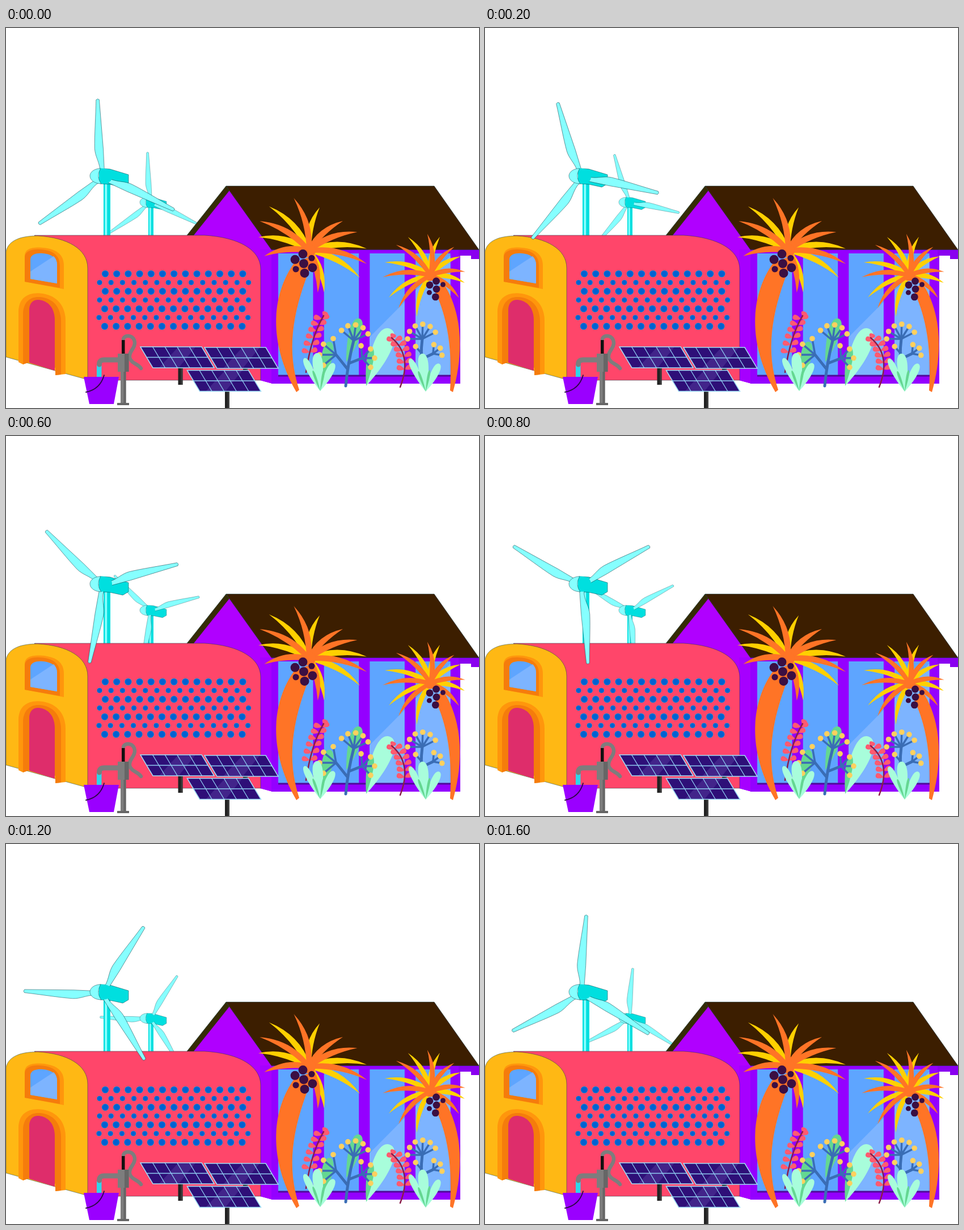
An HTML page for the animation above (1.7 s loop, 834x671 px).

```html
<!DOCTYPE html>
<html lang="en">
<head>
<meta charset="utf-8">
<title>Wind and sun village</title>
<style>
html, body { margin: 0; width: 100%; height: 100%; overflow: hidden; background: #fff; }
svg { display: block; width: 100%; height: 100%; }
.edge { stroke: #0a3a44; stroke-width: .5; }
</style>
</head>
<body>
<svg id="stage" viewBox="0 0 834 671"></svg>
<script>
const STEP = 100, LOOP = 1700, SWEEP = 120;
const LIGHT = '#86ffff', CYAN = '#00dfdf', ORANGE = '#ff7426', YELLOW = '#ffd000';
const STEM = '#3a6db5', PINK = '#ff5a70', MINT = '#a8fddb', GREEN = '#64d791';
const SKY = '#5ea5ff', GLARE = '#7db4ff', AMBER = '#ff960c', RUST = '#f57c0c';
const GRAY = '#7d7d7d', DIM = '#666';

const times = (n, f) => Array.from({ length: n }, (_, i) => f(i)).join('');
const polar = (x, y, r, deg) => {
  const a = deg * Math.PI / 180;
  return [x + r * Math.cos(a), y + r * Math.sin(a)];
};
const shape = (d, fill, extra = '') => `<path d="${d}" fill="${fill}" ${extra}/>`;
const line = (d, stroke, w) =>
  `<path d="${d}" fill="none" stroke="${stroke}" stroke-width="${w}" stroke-linecap="round"/>`;
const rect = (x, y, w, h, fill) =>
  `<rect x="${x}" y="${y}" width="${w}" height="${h}" fill="${fill}"/>`;
const disc = (x, y, r, fill) => `<circle cx="${x}" cy="${y}" r="${r}" fill="${fill}"/>`;

// Point at fraction k of the way from base to tip, s to the side
function axis(x, y, tx, ty) {
  const dx = tx - x, dy = ty - y, n = Math.hypot(dx, dy);
  return (k, s) => `${x + dx * k - dy / n * s},${y + dy * k + dx / n * s}`;
}

// Round-ended leaf
function leaf(x, y, tx, ty, w, fill) {
  const at = axis(x, y, tx, ty);
  return shape(`M${x},${y} C${at(.55, w)} ${at(1, w)} ${tx},${ty} C${at(1, -w)} ${at(.55, -w)} ${x},${y}Z`, fill);
}

// Pointed frond that arches upwards from the crown
function frond(x, y, len, deg, w, fill) {
  const [tx, ty] = polar(x, y, len, deg), at = axis(x, y, tx, ty);
  const bow = (tx < x ? 1 : -1) * len * .17;
  return shape(`M${at(0, -w * .5)} Q${at(.5, bow - w)} ${tx},${ty} Q${at(.5, bow + w)} ${at(0, w * .5)}Z`, fill);
}

/* ---------- turbines ---------- */
const BLADE = 'M-2.8,-137.5 Q0,-140.5 2.8,-137.5 L4.6,-50 L4,-4 H-4 L-3.5,-16 ' +
  'C-4.5,-30 -10.5,-38 -10.5,-52 C-9.5,-76 -5,-110 -2.8,-137.5Z';

const rotor = (id, x, y, s) =>
  `<g id="${id}" transform="translate(${x} ${y}) scale(${s})">${shape(BLADE, LIGHT, 'class="edge"').repeat(3)}</g>`;
const nacelle = shape('M166,248 L183,249 L216,259 V275 L206,281 L183,276 L166,275Z', CYAN, 'class="edge"');
const hub = shape('M164,248 C180,247 187,252 187,262 C187,272 180,275 164,275Z', CYAN) +
  shape('M167,248 C155,248 148,255 148,261 C148,269 157,275 168,275 C161,266 162,256 167,248Z', LIGHT, 'class="edge"');
const tower = (x, y, w) => rect(x, y, w, 370 - y, CYAN) + rect(x + w * .2, y, w * .32, 370 - y, LIGHT);
const shrink = g => `<g transform="translate(236 299) scale(.69 .66) translate(-148 -248)">${g}</g>`;

const smallTurbine = () => tower(251, 314, 9) + shrink(nacelle) + rotor('small', 255, 308.5, .644) + shrink(hub);
const bigRotor = () => nacelle + rotor('big', 170, 264, 1) + hub;

/* ---------- buildings ---------- */
function house() {
  return shape('M388,279 L319,366 L350,380 L394,287Z', '#352b05', 'class="edge"') +
    shape('M394,287 L331,366 L380,400 L448,420 V622 L470,628 V391Z', '#b000ff') +
    shape('M448,391 H470 V628 L448,622Z', '#a600ff') +
    rect(468, 391, 333, 237, '#9400ff') +
    shape('M798,391 H834 V408 H820 V402 H798Z', '#8a00f0') +
    times(4, i => rect(480 + i * 80.7, 398, 61.5, 216, SKY)) +
    shape('M702.5,484 V614 H641 V546Z', GLARE) +
    shape('M722,464 L783.5,402 V614 H722Z', GLARE) +
    rect(480, 612.5, 304, 3, '#4f0a9a') +
    shape('M388,279 H755 L834,391.5 H468Z', '#3c1e00', 'class="edge"');
}

// Rounded vents in alternating rows of large and small
function vents() {
  return times(7, row => {
    const small = row % 2, y = 434 + row * 15.45;
    const x0 = (small ? 165 : 175) - (row > 3 ? 1 : 0), r = small ? 4.1 : 5.6;
    return times(13 + small, i =>
      disc(x0 + i * 20.2, y, r + .7, '#3a8fc0') + disc(x0 + i * 20.2, y, r, '#0062d2'));
  });
}

function dome() {
  return shape('M50,366 H350 C412,370 449,392 449,426 V622 H144 L100,420Z', '#ff466a', 'class="edge"') +
    shape('M0,395 C4,374 28,367 56,367 C108,370 144,390 144,424 V621 L104,610 L0,581Z', '#ffb814', 'class="edge"') +
    // window
    shape('M33,448 V402 C33,391 44,387 60,387.5 C88,389 102,399 102,420 V461Z', AMBER) +
    shape('M33,448 V404 C34,394 46,390 60,391 C82,392 95,401 95,420 V459Z', RUST) +
    shape('M43,443 V408 C44,399 55,397 65,398 C80,399 90,406 90,418 V451Z', SKY) +
    shape('M43,443 V430 L84,403 C88,407 90,412 90,418 V451Z', GLARE) +
    // door
    shape('M22,590 V502 C22,478 37,467 60,468.5 C90,471 105,491 105,517 V611 L87,613 V600 L41,590 L30,594Z', AMBER) +
    shape('M30,594 V504 C31,484 42,474 60,475 C84,477 97,494 97,518 V612 L87,613 V600 L41,590Z', RUST) +
    shape('M41,591 V496 C42,484 49,479 58,480 C76,482 86,496 86,516 V605Z', '#de2d6b') +
    vents();
}

/* ---------- pump, bucket, solar panels ---------- */
function pump() {
  return rect(160, 594, 8.5, 24, '#2fd6ea') +
    shape('M137,616 H199 L190,664 H147Z', '#9a00ff') +
    line('M141,643 Q166,638 173,613', '#2c0845', 1.8) +
    line('M207,549 C209,541 226,541 227,556 C227,567 216,571 218,582 C221,593 232,592 238,601', GRAY, 6.5) +
    rect(204, 551, 5.5, 26, '#111') +
    line('M164.5,594 Q164.5,586 173,586 H199', GRAY, 9) +
    rect(202, 600, 9.5, 64, GRAY) + rect(207.5, 600, 4, 64, DIM) +
    rect(197, 575, 19.5, 32, GRAY) + rect(209, 575, 7.5, 32, DIM) +
    rect(196, 662, 21, 4, DIM);
}

function panel(x, y) {
  const p = (u, v) => `${x + u * 108 + v * 22},${y + v * 37}`;
  const box = `M${p(0, 0)} L${p(1, 0)} L${p(1, 1)} L${p(0, 1)}Z`;
  const grid = `M${p(0, .5)} L${p(1, .5)}` + times(4, i => `M${p((i + 1) / 5, 0)} L${p((i + 1) / 5, 1)}`);
  return shape(box, '#2e0f78') +
    shape(`M${p(.62, 0)} L${p(.9, 0)} L${p(.42, 1)} L${p(.1, 1)}Z`, '#42248a') +
    line(grid, '#8fcdf2', 1.3) + line(box, '#9fdcf5', 1.5);
}

function solar() {
  const leg = (x, y, h) => rect(x, y, 8, h, '#222') + rect(x + 5, y, 3, h, '#3c3c3c');
  return leg(303.5, 598, 32) + leg(418, 598, 10) + panel(237, 563) + panel(350, 564) +
    leg(386, 638, 33) + panel(319.5, 604.5);
}

/* ---------- palms ---------- */
function crown(x, y, w, reach, yellow, orange) {
  const fan = (angles, fill) => angles.map(a => frond(x, y, reach(a), a, w, fill)).join('');
  return fan(yellow, YELLOW) + fan(orange, ORANGE) + disc(x, y, w * 1.5, ORANGE);
}

// Cluster of nuts: one in the middle, the rest in a ring
const nuts = (x, y, ring, r, from, step, n) => disc(x, y, r, '#3b0f42') +
  times(n, i => disc(...polar(x, y, ring, from + i * step), i % 3 == 1 ? r * .7 : r, '#3b0f42'));

const palmLeft = () =>
  shape('M508,415 C468,472 462,555 512,643 L517,639 C494,568 503,500 546,400Z', ORANGE) +
  crown(534, 393, 8, a => 90 + 15 * Math.cos((a - 228) / 145 * 2 * Math.PI),
    [195, 228, 284, 358, 388, 430], [173, 211, 254, 319, 339, 373, 438]) +
  nuts(525, 416, 17, 8, -95, 60, 6);

// Evenly spread fronds, longer on the left
const spread = from => Array.from({ length: 7 }, (_, i) => from + i * 44);
const palmRight = () =>
  shape('M754,460 C784,520 786,585 783,640 L788,643 C806,580 807,506 772,452Z', ORANGE) +
  crown(748, 437, 6.5, a => 73 - 11 * Math.cos(a * Math.PI / 180), spread(108), spread(134)) +
  nuts(759, 461, 14, 6.4, 97, 57, 5);

/* ---------- flowers ---------- */
// Curved stem with paired leaflets
function sprig(x0, y0, cx, cy, x1, y1) {
  const q = (a, b, c, t) => (1 - t) ** 2 * a + 2 * t * (1 - t) * b + t * t * c;
  return times(6, i => {
    const t = .3 + i * .125, x = q(x0, cx, x1, t), y = q(y0, cy, y1, t);
    return leaf(x, y, x - 14, y - 4, 6, PINK) + leaf(x, y, x + 13, y - 6, 6, PINK);
  }) + leaf(x1, y1 + 2, x1 + 4, y1 - 7, 7, PINK) +
    line(`M${x0},${y0} Q${cx},${cy} ${x1},${y1}`, '#8a1c4a', 2.5);
}

// Fan of short twigs, each ending in a yellow berry
const umbel = (x, y, r, from, to, n) => times(n, i => {
  const [bx, by] = polar(x, y, r, from + (to - from) * i / Math.max(1, n - 1));
  return line(`M${x},${y} L${bx},${by}`, STEM, 3.5) + disc(bx, by, 4.8, '#ffd05e');
});

const tuft = (x, y) =>
  leaf(x, y, x - 28, y - 58, 8, MINT) + leaf(x, y, x + 24, y - 49, 9, MINT) +
  leaf(x, y, x - 6, y - 67, 12, MINT) +
  leaf(x, y, x + 7, y - 38, 3, GREEN) + leaf(x, y, x - 13, y - 36, 3, GREEN);

const plants = () =>
  leaf(600, 590, 623, 513, 14, GREEN) + leaf(635, 632, 677, 531, 22, MINT) +
  leaf(635, 632, 645, 565, 8, GREEN) + leaf(556, 632, 571, 554, 13, GREEN) +
  sprig(529, 608, 538, 545, 560, 508) + sprig(695, 634, 717, 578, 680, 547) +
  line('M599,632 Q603,590 613,552 M602,602 L582,577 M605,592 L628,583', STEM, 5) +
  umbel(613, 552, 28, -140, -25, 5) + umbel(582, 577, 29, 140, 260, 4) + umbel(628, 583, 22, -95, 47, 4) +
  line('M735,612 Q730,580 734,549 M734,584 L753,575', STEM, 5) +
  umbel(734, 549, 26, 180, 333, 6) + umbel(753, 575, 16, -85, 10, 3) + umbel(734, 576, 18, 229, 229, 1) +
  tuft(554, 641) + tuft(740, 642);

/* ---------- scene and motion ---------- */
document.getElementById('stage').innerHTML = smallTurbine() + tower(172, 270, 12) + house() + dome() +
  bigRotor() + pump() + solar() + palmLeft() + palmRight() + plants();

const rotors = ['big', 'small'].map(id => document.getElementById(id).children);

function draw(ms) {
  const t = Math.floor(ms % LOOP / STEP) * STEP;
  for (let i = 0; i < 3; i++) {
    const a = 93.5 + t / LOOP * SWEEP + i * 120;
    // slight lead in the lower half from the tilted view
    const lead = Math.max(0, -4.8 * Math.sin(a * Math.PI / 180));
    for (const blades of rotors) blades[i].setAttribute('transform', `rotate(${90 - a - lead})`);
  }
}

const start = performance.now();
function tick() {
  draw(performance.now() - start);
  requestAnimationFrame(tick);
}
draw(0);
requestAnimationFrame(tick);
</script>
</body>
</html>
```
